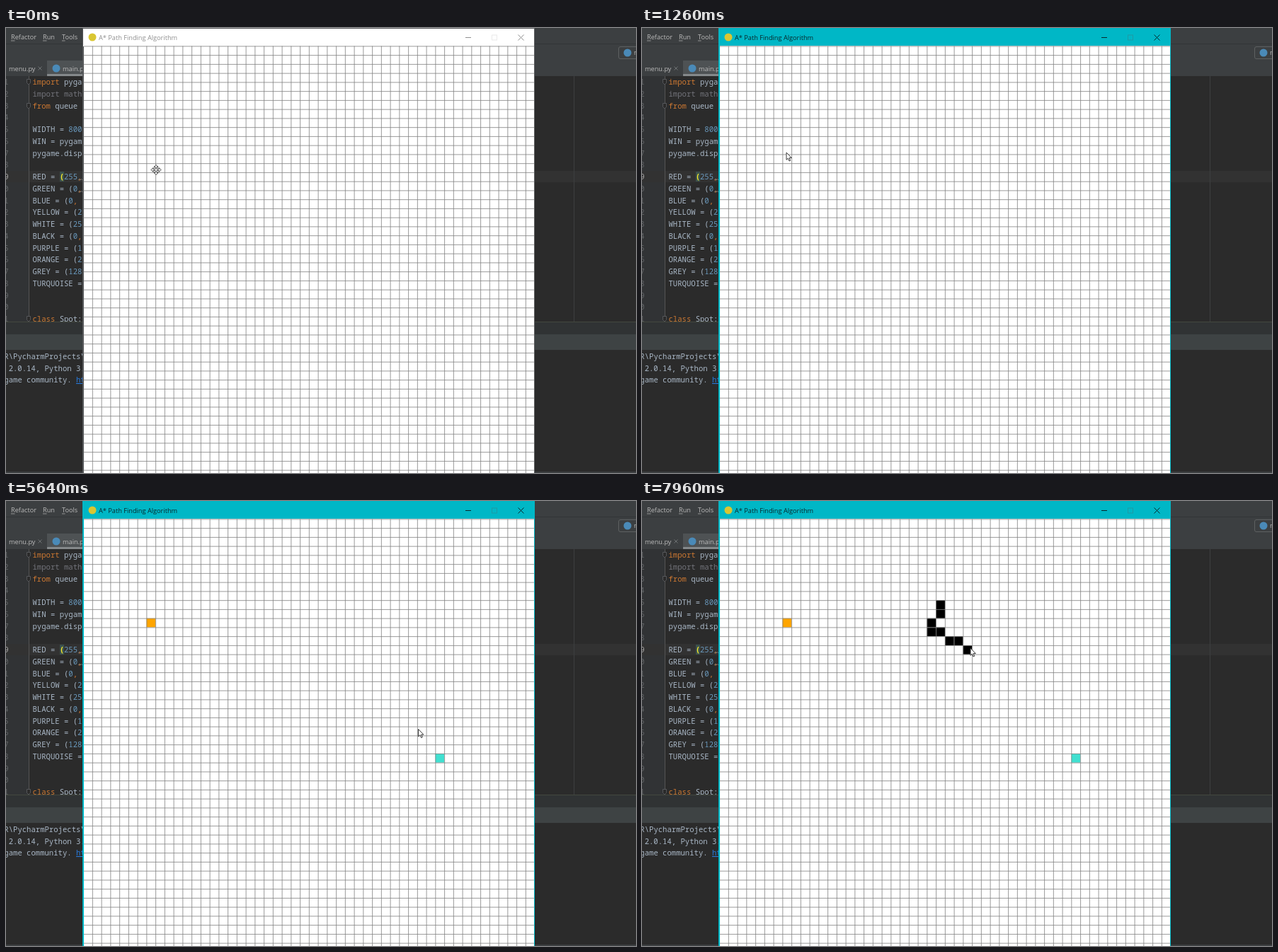
An HTML page that plays this animation: 890 by 629 pixels, repeating every 8 s.

```html
<!DOCTYPE html>
<html lang="en">
<head>
<meta charset="utf-8">
<title>Path finding grid</title>
<style>
  html, body { margin: 0; width: 100%; height: 100%; overflow: hidden; background: #2b2b2b; }
  svg { display: block; width: 890px; height: 629px; }
  text { white-space: pre; font: 9.2px "Open Sans", sans-serif; fill: #bbb; }
  .mono text { font: 10.6px "Noto Sans Mono", monospace; fill: #a9b7c6; }
  .key { fill: #cc7832; }
  .num { fill: #6897bb; }
  .dim { fill: #72737a; }
  .crisp { shape-rendering: crispEdges; }
  #win { --bar: #fff; --edge: #5a5c5e; --ink: #8f8f8f; --off: #e9e9e9; }
  #win.active { --bar: #00b7c6; --edge: #00b7c6; --ink: #08282c; --off: #1f9aa6; }
  #win text { fill: var(--ink); }
</style>
</head>
<body>
<svg viewBox="0 0 890 629">
  <!-- editor -->
  <g class="crisp">
    <rect width="890" height="629" fill="#2b2b2b"/>
    <rect y="68" width="32" height="347" fill="#313335"/>
    <rect y="202" width="890" height="16" fill="#323232"/>
    <rect x="32" y="68" width="1" height="347" fill="#555"/>
    <rect x="802" y="68" width="1" height="347" fill="#3d3f40"/>
    <rect x="76" y="203" width="6" height="14" fill="#3b514d"/>
  </g>
  <g id="code" class="mono"></g>
  <g fill="#2b2b2b" stroke="#606366" stroke-width=".8">
    <path id="fold" d="M29.5 72.5h5v5l-2.5 2.5l-2.5-2.5z"/>
    <use href="#fold" y="34"/>
    <use href="#fold" y="335"/>
  </g>
  <path d="M102 215l1.5-1.5l1.5 1.5l1.5-1.5l1.5 1.5M102 232l1.5-1.5l1.5 1.5l1.5-1.5l1.5 1.5" fill="none" stroke="#8a8a8a" stroke-width=".8"/>

  <!-- toolbars -->
  <g class="crisp">
    <rect width="890" height="68" fill="#3c3f41"/>
    <rect y="22" width="890" height="1" fill="#323537"/>
    <rect x="58" y="46" width="60" height="22" fill="#4e5254"/>
    <rect x="58" y="65" width="60" height="3" fill="#85898b"/>
    <rect y="415" width="890" height="18" fill="#303334"/>
    <rect y="415" width="890" height="1" fill="#43483f"/>
    <rect y="433" width="890" height="22" fill="#3e4344"/>
    <rect y="627" width="890" height="2" fill="#3c3f41"/>
  </g>
  <text x="7" y="16">Refactor</text>
  <text x="52" y="16">Run</text>
  <text x="79" y="16">Tools</text>
  <path d="M7 18h5.500M52 18h5.500M79 18h4.500" stroke="#bbb" stroke-width=".7"/>
  <text x="4" y="61">menu.py</text>
  <text x="80" y="61">main.py</text>
  <path d="M45.500 54.500l5 5m0-5l-5 5" stroke="#7c7f81" stroke-width=".8"/>
  <circle cx="71" cy="57" r="5.500" fill="#4a8ab8"/>
  <rect x="865.500" y="26.500" width="40" height="17" rx="2.500" fill="none" stroke="#5e6162"/>
  <circle cx="878" cy="35" r="5.500" fill="#4a8ab8"/>
  <text x="887" y="38">main</text>

  <!-- console -->
  <g class="mono">
    <text x="-2.700" y="468">R\PycharmProjects\</text>
    <text x="3.660" y="485">2.0.14, Python 3.</text>
    <text x="-2.700" y="501">game community. <tspan fill="#287bde" text-decoration="underline">https</tspan></text>
  </g>

  <!-- grid window -->
  <g id="win">
    <g class="crisp">
      <rect x="108" width="639" height="629" fill="var(--edge)"/>
      <rect x="109" y="1" width="637" height="25" fill="var(--bar)"/>
      <rect x="110" y="25" width="636" height="604" fill="#fff"/>
    </g>
    <g id="cells"></g>
    <path id="lines" stroke="#808080" stroke-width=".8"/>
    <circle cx="122" cy="13" r="5.500" fill="#d9c632"/>
    <text x="131" y="16.500">A* Path Finding Algorithm</text>
    <path d="M649 13.500h8M723.500 9.500l8 8m0-8l-8 8" stroke="var(--ink)" fill="none"/>
    <rect x="686.500" y="10" width="7" height="7" fill="none" stroke="var(--off)"/>
  </g>

  <g id="cursor" fill="#fff" stroke="#222" stroke-width=".9" stroke-linejoin="round">
    <path id="move" d="M-1-1V-4H-3L0-7L3-4H1V-1H4V-3L7 0L4 3V1H1V4H3L0 7L-3 4H-1V1H-4V3L-7 0L-4-3V-1Z"/>
    <path id="arrow" d="M0 0V10.300L2.400 8.200L4 12L5.700 11.300L4.100 7.600H7.300Z"/>
  </g>
</svg>
<script>
const LOOP = 8000, CELL = 12.75, LEFT = 109.2, TOP = 25.5, FOCUS = 1000, MOVE_END = 130;
const $ = id => document.getElementById(id);

const colour = (name, value) => `${name} = (<tspan class="num">${value}</tspan><tspan class="key">,</tspan> `;
const code = [
  '<tspan class="key">import</tspan> pygame',
  '<tspan class="dim">import math</tspan>',
  '<tspan class="key">from</tspan> queue',
  '',
  'WIDTH = <tspan class="num">800</tspan>',
  'WIN = pygame.display',
  'pygame.display',
  '',
  colour('RED', 255).replace('(', '<tspan fill="#ffef28" font-weight="bold">(</tspan>'),
  colour('GREEN', 0),
  colour('BLUE', 0),
  colour('YELLOW', 255),
  colour('WHITE', 255),
  colour('BLACK', 0),
  colour('PURPLE', 128),
  colour('ORANGE', 255),
  colour('GREY', 128),
  'TURQUOISE = (',
  '',
  '',
  '<tspan class="key">class</tspan> Spot:'
];
$('code').innerHTML = code.map((line, i) => {
  const y = 80 + 16.75 * i;
  return `<text x="3.5" y="${y}" text-anchor="end" style="fill:${i === 8 ? '#a4a3a3' : '#606366'}">${(i + 1) % 10}</text>` +
    `<text x="37.5" y="${y}">${line}</text>`;
}).join('');

// Lines are .8 wide and start on the cell edge
let lines = '';
for (let i = 0; i < 50; i++) {
  const offset = i * CELL + .4;
  if (i > 0) lines += `M${LEFT + offset} ${TOP}V629`;
  if (i < 48) lines += `M110 ${TOP + offset}H746`;
}
$('lines').setAttribute('d', lines);

// Pointer path: time, x, y, and the colour painted into the cell below
const path = [
  [0, 212, 200.5], [130, 212, 200], [630, 208, 187], [1100, 204, 176],
  [2060, 204, 176, '#ffa500'],
  [2700, 204, 176], [2910, 645, 352], [3090, 645, 352], [3370, 611, 362],
  [4290, 611, 362, '#40e0d0'],
  [4900, 611, 362], [5180, 600, 341], [5560, 600, 341],
  [6400, 419, 150], [6480, 427.5, 149],
  [6740, 427.5, 149, '#000'],
  [7120, 427.5, 149], [7240, 422, 158, '#000'], [7360, 413, 172, '#000'],
  [7480, 409, 184, '#000'], [7600, 418, 189, '#000'], [7720, 433, 196, '#000'],
  [7820, 445, 202, '#000'], [7900, 457, 207, '#000'], [7960, 464, 208],
  [LOOP, 464, 208]
];

const painted = path.filter(p => p[3]).map(([time, px, py, fill]) => {
  const x = LEFT + Math.floor((px - LEFT) / CELL) * CELL;
  const y = TOP + Math.floor((py - TOP) / CELL) * CELL;
  const rect = document.createElementNS('http://www.w3.org/2000/svg', 'rect');
  const box = { x, y, width: CELL, height: CELL, fill };
  for (const key in box) rect.setAttribute(key, box[key]);
  $('cells').append(rect);
  return { time, rect };
});

const show = (el, on) => { el.style.display = on ? '' : 'none'; };

function draw(now) {
  const t = now % LOOP;
  const next = path.findIndex(p => p[0] > t);
  const [t0, x0, y0] = path[next - 1], [t1, x1, y1] = path[next];
  const k = (t - t0) / (t1 - t0);
  $('cursor').setAttribute('transform', `translate(${x0 + (x1 - x0) * k} ${y0 + (y1 - y0) * k})`);
  show($('move'), t < MOVE_END);
  show($('arrow'), t >= MOVE_END);
  $('win').classList.toggle('active', t >= FOCUS);
  for (const { time, rect } of painted) show(rect, t >= time);
  requestAnimationFrame(draw);
}
draw(0);
</script>
</body>
</html>
```
